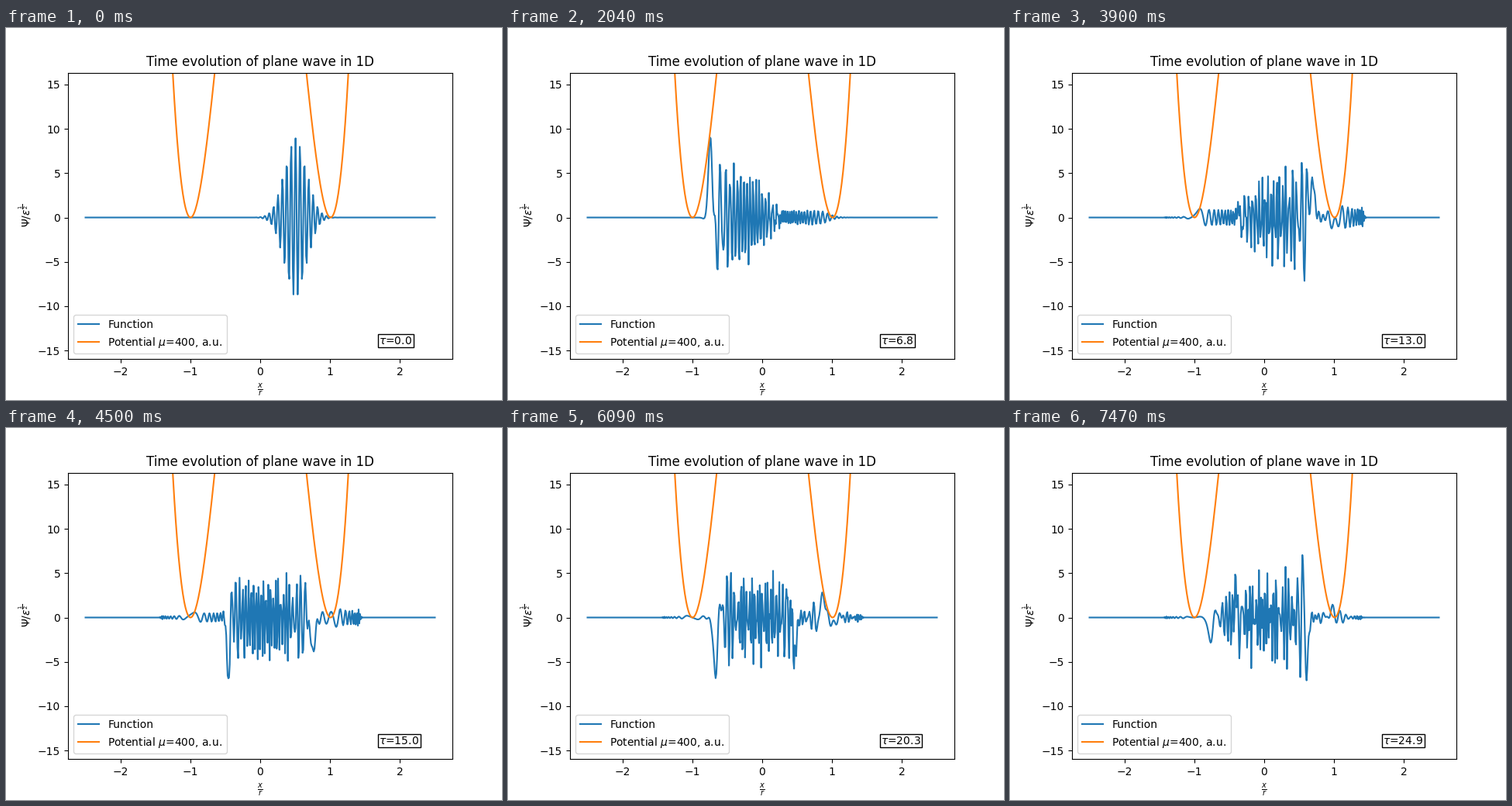
A matplotlib script for the animation above (7.5 s loop, 640x480 px).

```python
import numpy as np
import matplotlib.pyplot as plt
from matplotlib.animation import FuncAnimation

N = 500            # lattice sites
LENGTH = 5.0
MU = 400
FRAMES = 250
D_TAU = 0.1
K0, X0, SHARPNESS = 100, 0.5, 20

eps = LENGTH / N
x = (np.arange(N) - N // 2) * eps
grid = np.linspace(-LENGTH / 2, LENGTH / 2, N)
potential = MU / 8 * (x**2 - 1) ** 2

# Tight-binding Hamiltonian on an open chain
hop = 1 / (2 * MU * eps**2)
side = np.full(N - 1, hop)
H = np.diag(potential + 2 * hop) + np.diag(side, 1) + np.diag(side, -1)
energy, modes = np.linalg.eigh(H)

# Gaussian wave packet expanded in eigenmodes
amp = (2 * SHARPNESS / np.pi * N) ** 0.25
d = x - X0
psi0 = amp * np.exp(-SHARPNESS * d**2 + 1j * K0 * d)
coeff = modes.T @ psi0


def wave(tau):
    c = coeff * np.exp(-1j * energy * tau)
    return modes @ c.real


fig, ax = plt.subplots(figsize=(6.4, 4.8), dpi=100)
line, = ax.plot(grid, wave(0), label="Function")
ax.plot(grid, potential, label=r"Potential $\mu$=400, a.u.")
ax.set_xlim(-2.75, 2.75)
ax.set_ylim(-15.97, 16.34)
ax.set_title("Time evolution of plane wave in 1D")
ax.set_xlabel(r"$\frac{x}{r}$")
ax.set_ylabel(r"$\Psi/\varepsilon^{\frac{1}{2}}$")
ax.legend(loc="lower left")
clock = ax.text(1.7, -14.28, "", bbox=dict(facecolor="white", pad=1))


def update(i):
    tau = i * D_TAU
    line.set_ydata(wave(tau))
    clock.set_text(rf"$\tau$={tau:.1f}")
    return line, clock


anim = FuncAnimation(fig, update, frames=FRAMES, interval=30,
                     repeat=True, repeat_delay=0)
plt.show()
```
